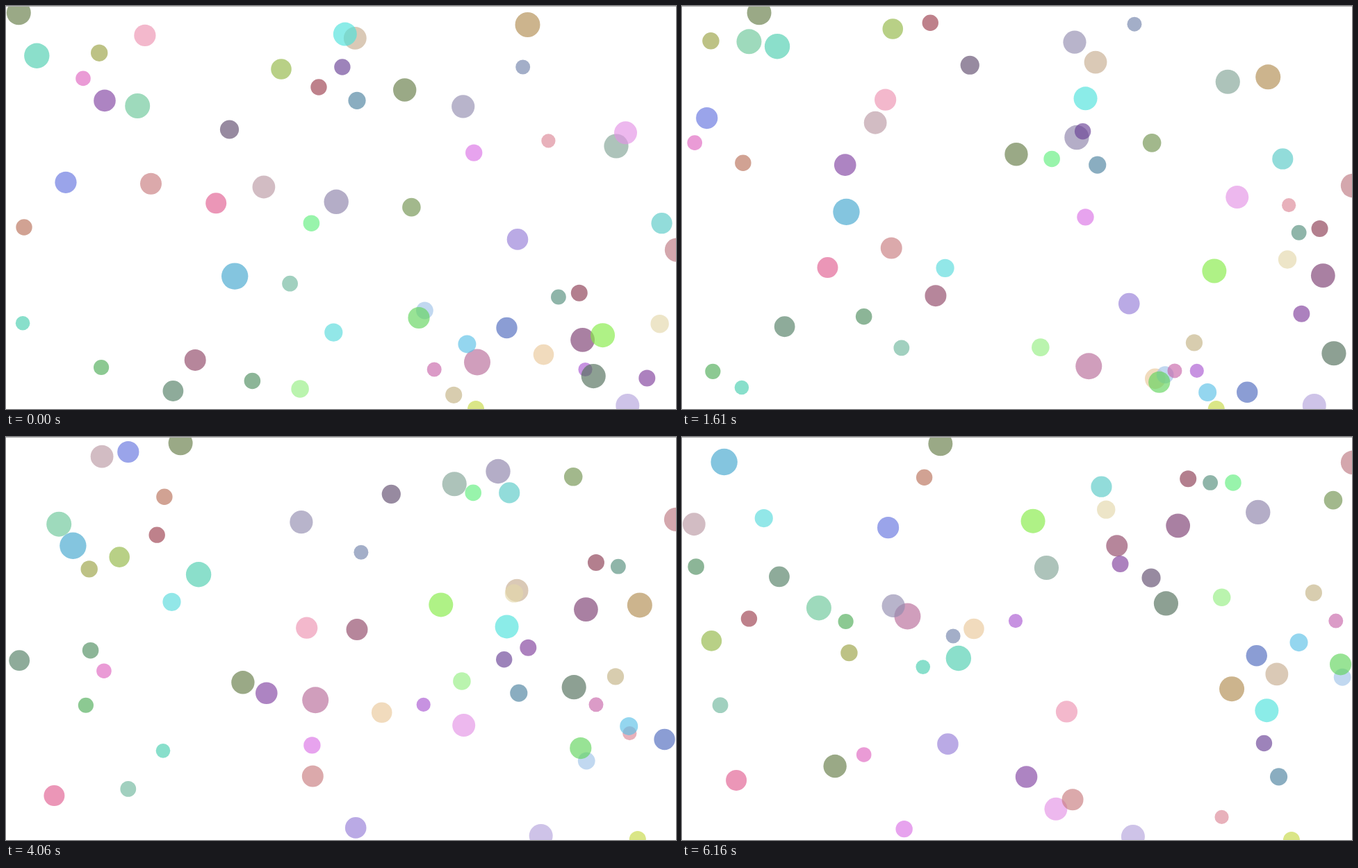
Animation, 964 px wide and 581 px high, one loop 6.23 s. Source, as an HTML page with a canvas:

```html
<!DOCTYPE html>
<html lang="en">
<head>
<meta charset="utf-8">
<title>Bouncing balls</title>
<style>
  html, body { margin: 0; width: 100%; height: 100%; overflow: hidden; background: #fff; }
  canvas { display: block; }
</style>
</head>
<body>
<canvas id="stage" width="964" height="581"></canvas>
<script>
const ctx = document.getElementById('stage').getContext('2d');
const LOOP = 6230, STEP = 70, SPEED = 0.966, ALPHA = 0.65;
const LEFT = -1, RIGHT = 965, TOP = 1, BOTTOM = 581;

// Physics ticks reached at certain steps; the rate wavers slightly.
const PACE = [[0, 0], [7, 29], [23, 96], [43, 179], [58, 241], [70, 290], [88, 366]];

const balls = [];

// Each row: x, y, radius, colour as seen on white. Later rows lie on top.
function add(dx, dy, rows) {
  for (const [x, y, r, tint] of rows) balls.push({ x, y, r, dx, dy, fill: ink(tint) });
}

// Translucent colour that gives the tint on a white ground.
function ink(tint) {
  const rgb = [0, 2, 4].map(i => {
    const v = parseInt(tint.slice(i, i + 2), 16);
    return Math.round((v - 255 * (1 - ALPHA)) / ALPHA);
  });
  return `rgba(${rgb},${ALPHA})`;
}

add(-1, 1, [[678, 513.5, 19, 'd09fbc']]);

add(1, -1, [
  [18.3, 9.8, 17.5, '9ba986'],
  [44.3, 71.7, 18.2, '8cdfcb'],
  [502.3, 46.3, 16.4, 'dac9b6'],
  [750.5, 27, 18, 'ccb48e'],
  [321.5, 178, 13.6, '978aa0'],
  [475.2, 282.3, 17.7, 'b5aec7'],
  [439.4, 313.2, 11.8, '98f4ab'],
  [583.4, 290.1, 13.3, 'a2b88c'],
  [943.5, 313.2, 15.1, '92dcda'],
  [794.9, 419.5, 10.9, '8fb5a9'],
  [824.8, 413.7, 12, 'b37f8e'],
  [272.2, 510.4, 15.5, 'b6869b'],
  [829.6, 481.4, 17.4, 'aa80a2'],
  [940.6, 458.2, 13.2, 'ede5c8'],
  [922.3, 536.5, 12, 'ac81be'],
  [894.3, 576, 17, 'cec4e8'],
  [676, 581, 12, 'dae687']
]);

add(-1, -1, [
  [134.2, 67.7, 12.2, 'bdc285'],
  [189.2, 144, 18, '9fdabc'],
  [471.3, 470.6, 13.1, '92e7e8'],
  [396, 91, 14.8, 'b8d086'],
  [450, 117, 11.7, 'be818b'],
  [657.7, 144.9, 16.6, 'b8b5cb'],
  [743.7, 88, 10.5, 'a3aec8'],
  [878, 202, 17.6, 'aec4ba'],
  [86, 254.3, 15.6, '9aa4ea'],
  [370.9, 261, 16.4, 'd2bcc4'],
  [26, 319, 11.7, 'd1a293'],
  [329.2, 389.6, 19.2, '85c5df'],
  [965, 351.7, 17.2, 'd4a8ae'],
  [354.4, 540.5, 11.8, '8cb597'],
  [240.4, 555, 14.9, '8eab9a'],
  [858.6, 474.7, 17.5, 'b0f287']
]);

add(-1, 1, [
  [111, 104.4, 10.8, 'ea9bd6'],
  [673.2, 211.6, 12.2, 'e7a3ee'],
  [891.5, 182.8, 16.5, 'edb8ee'],
  [302.2, 284.3, 15, 'eb96b7'],
  [408.6, 400.2, 11.4, 'a1d0bf'],
  [736, 336.4, 15.3, 'baaae5'],
  [24.1, 457.2, 10.3, '88dfcb'],
  [137.1, 521, 11.1, '8cc992'],
  [773.5, 502.6, 14.8, 'f1dbbd'],
  [833.5, 524, 10.1, 'c792e1']
]);

add(1, 1, [
  [199.9, 42.4, 15.6, 'f3b8cc'],
  [142, 136.4, 15.8, 'ae85c2'],
  [483.9, 88, 11.7, '9d83ba'],
  [505, 136.3, 12.6, '8aadc0'],
  [780.4, 194.4, 10.1, 'e8b1bb'],
  [208.5, 256.2, 15.5, 'dba9ab'],
  [423.1, 552, 12.8, 'baf4ae'],
  [602.4, 439, 12.4, 'c1d8f0'],
  [594, 449.5, 15.6, '98e395'],
  [720.5, 464, 15.2, '8b9dd4'],
  [663.4, 487.4, 13, '94d6ef'],
  [616.2, 524, 10.5, 'db9bc7'],
  [845.2, 533.6, 17.6, '8ea194'],
  [644.2, 560.8, 12.1, 'd8cdaf'],
  [487.8, 40.6, 17, '8bece8']
]);

add(-1, 1, [[573.7, 121, 16.7, '9ba986']]);

function ticksAt(step) {
  const i = PACE.findIndex(([s]) => s >= step);
  if (i < 1) return 0;
  const [s0, n0] = PACE[i - 1], [s1, n1] = PACE[i];
  return Math.round(n0 + (n1 - n0) * (step - s0) / (s1 - s0));
}

// A ball that starts across an edge flips every tick and stays there.
function place({ x, y, r, dx, dy }, ticks) {
  for (let i = 0; i < ticks; i++) {
    x += dx * SPEED;
    y += dy * SPEED;
    if (x - r < LEFT || x + r > RIGHT) dx = -dx;
    if (y - r < TOP || y + r > BOTTOM) dy = -dy;
  }
  return [x, y];
}

function draw(step) {
  const ticks = ticksAt(step);
  ctx.fillStyle = '#fff';
  ctx.fillRect(0, 0, 964, 581);
  for (const ball of balls) {
    const [x, y] = place(ball, ticks);
    ctx.fillStyle = ball.fill;
    ctx.beginPath();
    ctx.arc(x, y, ball.r, 0, 2 * Math.PI);
    ctx.fill();
  }
  ctx.fillStyle = '#b0b0b0';
  ctx.fillRect(0, 0, 964, 1);
}

const start = performance.now();
let shown = -1;

function frame() {
  const step = Math.floor((performance.now() - start) % LOOP / STEP);
  if (step !== shown) draw(shown = step);
  requestAnimationFrame(frame);
}
frame();
</script>
</body>
</html>
```
